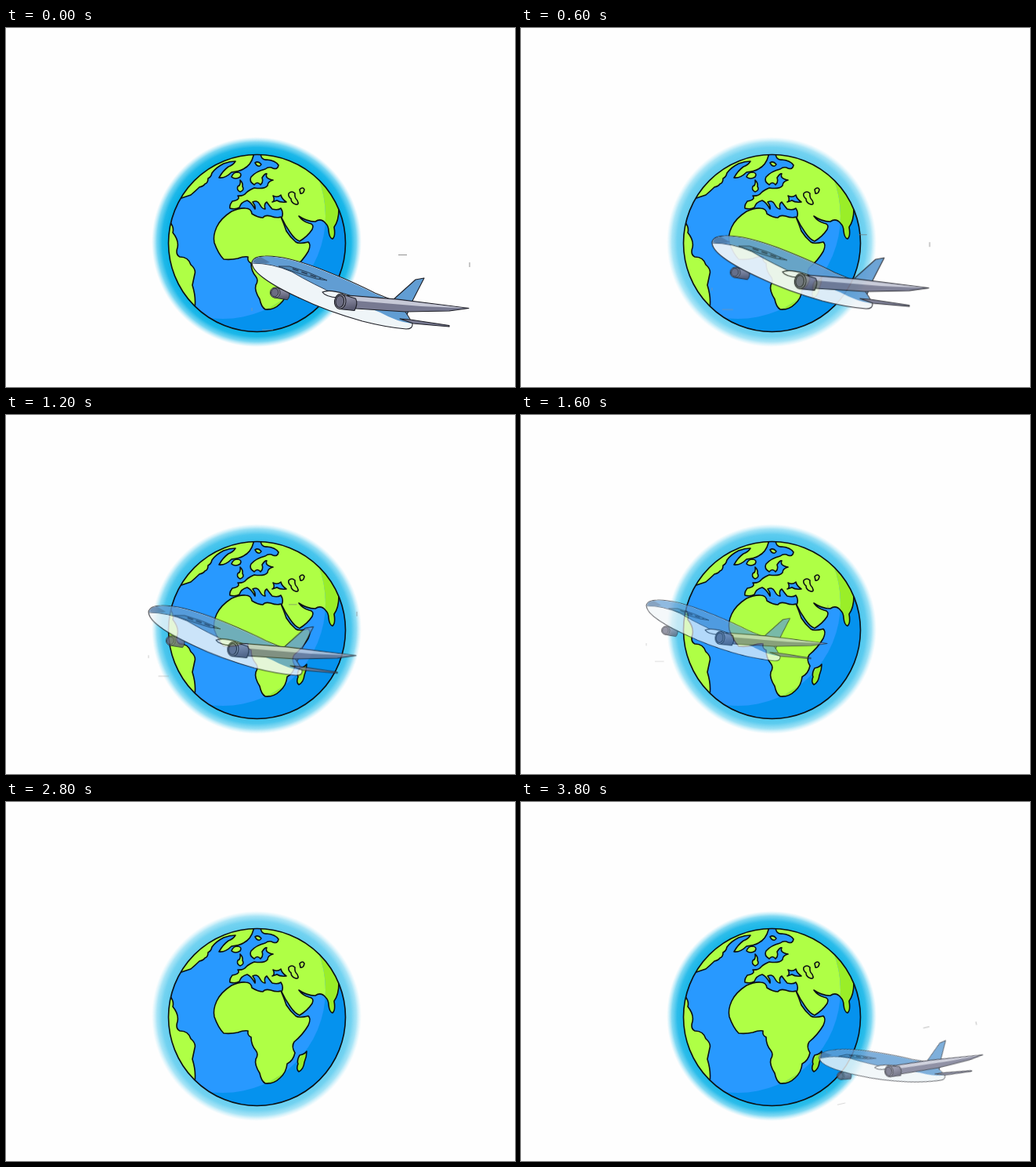
Recreate the animation shown at these times as an HTML page without scripts. Size 650x458 px, loop 4 s.

```html
<!DOCTYPE html>
<html lang="en">
<head>
<meta charset="utf-8">
<title>Plane around the globe</title>
<style>
html, body { margin: 0; width: 100%; height: 100%; overflow: hidden; background: #fefefe; }
svg { display: block; width: 650px; height: 458px; }
.glow { animation: pulse 4s infinite; }
.plane { transform-origin: 0 0; animation: fly 4s step-end infinite; }
.ink { fill: none; stroke: #0b0f12; stroke-width: 1.6; stroke-linejoin: round; }
.body { stroke: #1d1e25; stroke-width: 1.1; stroke-linejoin: round; }
.blue { fill: #619dd3; }
.white { fill: #eff5f8; }
.steel { fill: #777991; }

@keyframes pulse {
  0%   { opacity: 1; animation-timing-function: steps(3); }
  15%  { opacity: .62; animation-timing-function: steps(3); }
  30%  { opacity: .8; animation-timing-function: steps(2); }
  40%  { opacity: .72; animation-timing-function: steps(2); }
  50%  { opacity: .45; animation-timing-function: steps(4); }
  70%  { opacity: .62; animation-timing-function: steps(6); }
  100% { opacity: 1; }
}
@keyframes fly {
  0%   { transform: translate(314px, 297px) scale(1) rotate(0deg); opacity: 1; animation-timing-function: steps(5); }
  25%  { transform: translate(197px, 254px) scale(1) rotate(0deg); opacity: .87; }
  30%  { transform: translate(182px, 249px) scale(.957) rotate(0deg); opacity: .82; }
  35%  { transform: translate(171px, 245px) scale(.9) rotate(0deg); opacity: .76; }
  40%  { transform: translate(160px, 241px) scale(.834) rotate(0deg); opacity: .7; }
  45%  { transform: translate(140px, 233px) scale(.765) rotate(0deg); opacity: .67; }
  50%  { transform: translate(110px, 224px) scale(.69) rotate(0deg); opacity: .64; }
  55%  { transform: translate(72px, 208px) scale(.58) rotate(-16deg); opacity: .45; }
  60%  { transform: translate(149px, 183px) scale(.45) rotate(-25deg); opacity: .26; }
  65%  { transform: translate(176px, 190px) scale(.35) rotate(-28deg); opacity: .1; }
  70%  { transform: translate(180px, 195px) scale(.3) rotate(-28deg); opacity: 0; }
  85%  { transform: translate(438px, 312px) scale(.62) rotate(-26deg); opacity: .35; }
  90%  { transform: translate(408px, 322px) scale(.68) rotate(-20deg); opacity: .6; }
  95%  { transform: translate(380px, 325px) scale(.74) rotate(-13deg); opacity: .82; }
  100% { transform: translate(314px, 297px) scale(1) rotate(0deg); opacity: 1; }
}
</style>
</head>
<body>
<svg viewBox="0 0 650 458" role="img" aria-label="An airliner circling the Earth">
  <defs>
    <radialGradient id="halo">
      <stop offset=".84" stop-color="#08b0e6"/>
      <stop offset=".9" stop-color="#14b5e8" stop-opacity=".96"/>
      <stop offset=".95" stop-color="#34c2ec" stop-opacity=".68"/>
      <stop offset="1" stop-color="#7bd9f4" stop-opacity="0"/>
    </radialGradient>
    <linearGradient id="metal" x2=".3" y2="1">
      <stop offset="0" stop-color="#9a9bb0"/>
      <stop offset=".4" stop-color="#85869d"/>
      <stop offset="1" stop-color="#5b5c72"/>
    </linearGradient>
    <clipPath id="disc"><circle cx="320.5" cy="274.5" r="113"/></clipPath>
    <clipPath id="lit"><circle cx="277" cy="240" r="131"/></clipPath>

    <g id="land">
      <!-- North America and Greenland -->
      <path d="M221 218L236 213Q242 208 247 203Q252 202 254 199Q258 198 258 192Q262 190 263 185Q268 178 278 173Q286 170 293 170Q290 175 284 177Q277 182 272 191Q280 192 288 184Q298 183 303 180Q313 175 316 163L318 150H240L190 200Z"/>
      <!-- South America -->
      <path d="M209 247Q215 254 213 261Q221 271 219 280Q216 289 222 292Q233 292 236 302Q243 308 241 314L238 328Q243 344 241 357L190 365V240Z"/>
      <!-- Europe and Asia -->
      <path d="M325 158Q325 169 333 168Q344 169 348 175Q347 181 341 179Q336 176 331 180Q319 183 313 190Q310 196 317 200Q321 195 325 200Q329 197 327 191Q331 185 333 186Q330 192 341 194Q334 196 334 201Q330 206 317 204Q310 207 307 210Q303 215 296 214Q300 219 289 221Q285 226 286 230Q293 232 298 229Q300 222 308 220Q313 222 318 231Q319 227 315 222Q321 219 324 225Q327 231 331 231Q329 224 333 222Q338 229 340 231Q347 233 351 230Q355 236 352 242Q356 251 363 261Q369 270 375 272Q385 266 391 257Q394 250 387 249Q379 247 374 240Q384 247 395 247Q402 242 408 249Q412 253 412 259Q413 268 417 269Q421 266 419 254Q425 246 425 231L450 225V150Z"/>
      <!-- Africa -->
      <path d="M288 234Q299 229 306 230Q313 230 314 237Q322 242 328 242Q331 238 338 240Q346 243 351 241Q355 250 358 259Q363 267 370 273Q374 276 386 273Q390 276 386 285Q379 297 368 306Q364 312 369 320Q367 330 359 334Q358 345 350 352Q342 360 331 359Q326 356 324 346Q317 335 319 328Q323 322 319 317Q313 310 313 300Q308 298 309 292Q304 291 296 294Q287 296 278 295Q271 288 266 274Q264 265 269 254Q274 243 288 234Z"/>
      <!-- islands -->
      <path d="M384 318Q381 322 375 323Q371 330 373 334Q370 341 374 344Q380 341 381 332Q384 325 384 318Z"/>
      <path d="M288 190Q290 184 296 184Q302 185 299 190Q293 194 288 190ZM318 172Q322 169 326 174Q324 178 320 175ZM299 194Q303 198 302 202Q305 207 299 209Q294 207 296 202Q300 201 299 194Z"/>
    </g>
    <g id="engine" class="body">
      <path fill="url(#metal)" d="M8 0L28 4Q32 11 28 20L8 20Z"/>
      <ellipse cx="8" cy="10" rx="7.5" ry="10" fill="#9a9bae"/>
      <ellipse cx="7.5" cy="10" rx="5.5" ry="8" fill="#6b6c82"/>
    </g>
  </defs>

  <circle class="glow" cx="320" cy="273" r="134" fill="url(#halo)"/>

  <g clip-path="url(#disc)">
    <circle cx="320.5" cy="274.5" r="114" fill="#0592ee"/>
    <use href="#land" fill="#9aee28"/>
    <g clip-path="url(#lit)">
      <circle cx="320.5" cy="274.5" r="114" fill="#2899ff"/>
      <use href="#land" fill="#afff45"/>
    </g>
    <use href="#land" class="ink"/>
    <path class="ink" style="fill:#2899ff" d="M340 222Q344 220 341 214Q347 217 351 213Q352 218 358 222Q350 223 346 220Z"/>
    <path class="ink" d="M361 211Q365 207 369 211Q368 216 372 220Q375 226 370 225Q364 223 364 218Q360 215 361 211ZM375 206Q379 202 381 206Q380 212 376 211Z"/>
  </g>
  <circle class="ink" cx="320.5" cy="274.5" r="113"/>

  <g class="plane">
    <g transform="translate(-314 -297)">
      <use href="#engine" transform="translate(338 330) rotate(9) scale(.85 .66)"/>
      <path class="body blue" d="M494 347L523 321L534 319L517 352L512 366Z"/>
      <path class="body white" d="M314 299Q316 291 331 291Q355 290 398 306Q442 323 471 338L498 349Q510 360 519 377Q520 384 511 384Q486 382 455 374Q409 361 376 345Q345 331 329 319Q314 308 314 299Z"/>
      <path class="blue" d="M315 299Q317 292 331 291.500Q355 291 398 307Q442 324 471 339L498 350Q510 360 518 377Q500 375 478 363L428 343Q390 326 365 311Q340 300 315 299Z"/>
      <path d="M314 300Q340 300 365 311Q390 326 428 343" fill="none" stroke="#34465d"/>
      <path d="M348 304L362 304Q385 310 410 322L396 320Q369 312 348 304Z" fill="#5088b8" stroke="#24394f" stroke-width=".9"/>
      <path d="M366 307L402 320" stroke="#2d4764" stroke-width="2" stroke-dasharray="8 4"/>
      <path d="M315 299Q317 293 325 292L337 299Q325 302 315 299Z" fill="#527ba6"/>
      <path class="body steel" d="M503 371L516 372L566 379.500V381L520 377Z"/>
      <path class="body white" d="M404 337Q412 333 432 339L450 345L446 351L424 344Q408 343 404 337Z"/>
      <path class="body steel" d="M436 341L500 346L591 357.500L566 361L510 362L447 358Z"/>
      <path d="M438 342L500 347L588 357.500L530 355L447 348Z" fill="#c6c8d6"/>
      <use href="#engine" transform="translate(420 338.500) rotate(6) scale(.97 .96)"/>
      <path d="M501 289.500H512M592 299V305" stroke="#777" stroke-width=".8"/>
      <path d="M327 385H341M314 357V361" stroke="#999" stroke-width=".6"/>
    </g>
  </g>
</svg>
</body>
</html>
```
